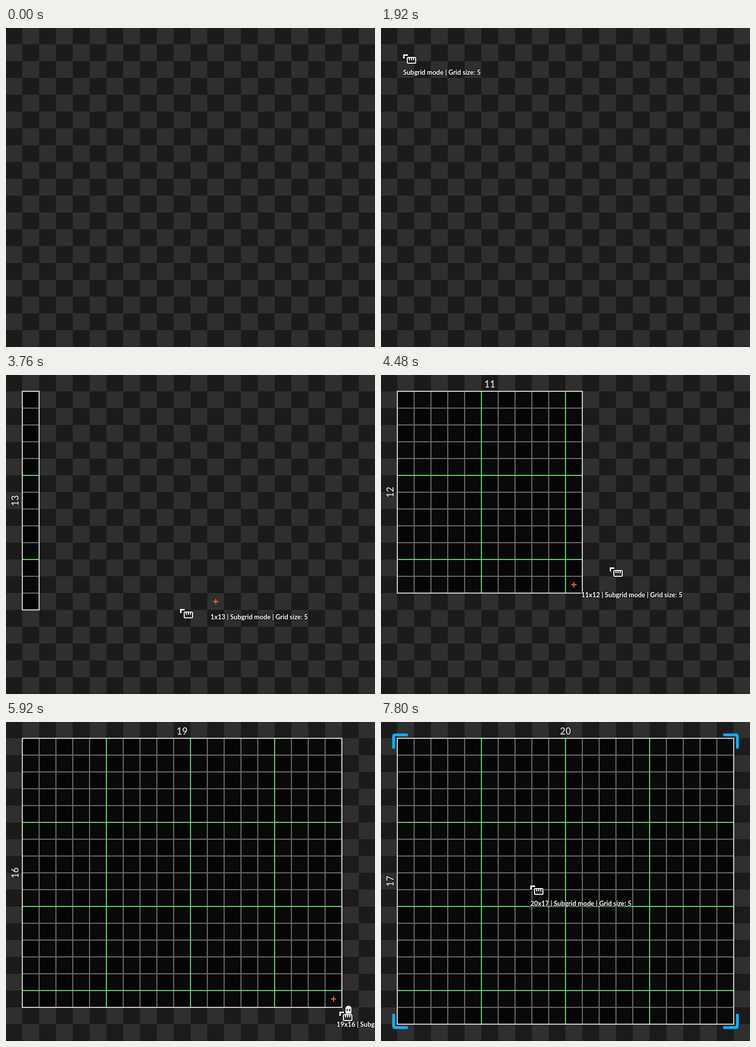
Recreate the animation shown at these times as an HTML page with a canvas. Size 702x607 px, loop 8000 ms.

```html
<!DOCTYPE html>
<html lang="en">
<head>
<meta charset="utf-8">
<title>Grid ruler</title>
<style>
html, body { margin: 0; width: 100%; height: 100%; overflow: hidden; background: #1b1b1b; }
canvas { display: block; }
</style>
</head>
<body>
<canvas id="stage" width="702" height="607"></canvas>
<script>
const W = 702, H = 607, LOOP = 8000, STEP = 40;
const CELL = 32, ORIGIN = 31, MAJOR = 5;
const LAG = 60, REACH = 610;
const SHOW = 640, DRAG = 2160, AREA = 4200, DONE = 6760, SELECT = 7800;
const FONT = 'Lato, "Open Sans", sans-serif';
const INK = '#f2f2f2', SHADE = 'rgba(12,12,12,.75)';
const c = document.getElementById('stage').getContext('2d');

// pointer stops: arrival time, x, y, rest
const path = [
  [640, 363, 545], [1380, 54, 120], [1860, 42, 49, 280],
  [2700, 493, 141], [2760, 541, 152], [3140, 665, 174],
  [3700, 389, 425], [3760, 331, 444], [4060, 115, 474],
  [4640, 508, 340, 120], [5160, 527, 404], [5860, 629, 540],
  [5960, 635, 553, 220], [6380, 655, 559, 320], [7340, 284, 310, 660]
].flatMap(([t, x, y, rest]) => rest ? [[t, x, y], [t + rest, x, y]] : [[t, x, y]]);

const rate = (i, k) => (path[i + 1][k] - path[i][k]) / (path[i + 1][0] - path[i][0]);

// harmonic mean keeps the curve from overshooting its stops
function slope(i, k) {
  if (i === 0 || i === path.length - 1) return 0;
  const a = rate(i - 1, k), b = rate(i, k);
  return a * b > 0 ? 2 * a * b / (a + b) : 0;
}

function pointer(t) {
  t = Math.max(path[0][0], t);
  let i = 0;
  while (i < path.length - 2 && t >= path[i + 1][0]) i++;
  const a = path[i], b = path[i + 1], d = b[0] - a[0];
  const u = (t - a[0]) / d, v = 1 - u;
  const axis = k => v * v * (1 + 2 * u) * a[k] + u * u * (3 - 2 * u) * b[k]
    + d * u * v * (v * slope(i, k) - u * slope(i + 1, k));
  return { x: Math.round(axis(1)), y: Math.round(axis(2)) };
}

const cellAt = v => Math.max(0, Math.floor((v - ORIGIN) / CELL));
const edge = n => ORIGIN + n * CELL;

function rect(color, x, y, w, h) {
  c.fillStyle = color;
  c.fillRect(x, y, w, h);
}

function stroke(color, width) {
  c.strokeStyle = color;
  c.lineWidth = width;
  c.stroke();
}

function write(str, x, y, size, color, align) {
  c.font = `700 ${size}px ${FONT}`;
  c.textAlign = align;
  c.lineJoin = 'round';
  c.lineWidth = 3;
  c.strokeStyle = SHADE;
  c.strokeText(str, x, y);
  c.fillStyle = color;
  c.fillText(str, x, y);
}

function board() {
  rect('#1b1b1b', 0, 0, W, H);
  for (let j = 0; j < 19; j++)
    for (let i = 0; i < 22; i++)
      if ((i + j) % 2) rect('#2f2f2f', edge(i - 1), edge(j - 1), CELL, CELL);
  rect('rgba(36,10,18,.45)', 0, H - 1, W, 1);
}

function ruler(cols, rows) {
  const w = cols * CELL, h = rows * CELL;
  rect('rgba(0,0,0,.81)', ORIGIN, ORIGIN, w, h);
  for (const major of [false, true]) {
    const color = major ? '#65d565' : '#6b6b6b';
    for (let i = 1; i < cols; i++)
      if ((i % MAJOR === 0) === major) rect(color, edge(i) - 1, ORIGIN, 2, h);
    for (let j = 1; j < rows; j++)
      if ((j % MAJOR === 0) === major) rect(color, ORIGIN, edge(j) - 1, w, 2);
  }
  c.strokeStyle = '#d2d2d2';
  c.lineWidth = 2;
  c.lineJoin = 'miter';
  c.strokeRect(ORIGIN, ORIGIN, w, h);
  if (cols > 1) write(cols, ORIGIN + w / 2, 24, 18, '#cdcdcd', 'center');
  if (rows > 1) {
    c.save();
    c.translate(24, ORIGIN + h / 2);
    c.rotate(-Math.PI / 2);
    write(rows, 0, 0, 18, '#cdcdcd', 'center');
    c.restore();
  }
}

function cross(x, y) {
  rect('#f4660f', x - 5, y - 1, 10, 2);
  rect('#f4660f', x - 1, y - 5, 2, 10);
}

function ghost(x, y) {
  c.fillStyle = '#fff';
  c.beginPath();
  c.roundRect(x, y, 11, 20, [5, 5, 2, 2]);
  c.fill();
  for (const eye of [2, 7]) rect('#111', x + eye, y + 6, 2, 4);
}

function icon(x, y) {
  c.save();
  c.translate(x, y);
  rect(SHADE, -1, 0, 11, 5);
  rect(SHADE, -1, 5, 5, 6);
  rect(INK, 0, 1, 9, 3);
  rect(INK, 0, 1, 3, 8);
  c.beginPath();
  c.roundRect(8, 7, 16, 11, 1.5);
  c.fillStyle = 'rgba(42,42,42,.9)';
  c.fill();
  stroke(SHADE, 4);
  stroke(INK, 2);
  for (let i = 0; i < 3; i++) rect(INK, 11 + 4 * i, 8, 2, 4);
  c.restore();
}

function corners(cols, rows) {
  const x = cols * CELL / 2 + 7, y = rows * CELL / 2 + 6.5;
  for (const sx of [-1, 1]) for (const sy of [-1, 1]) {
    c.save();
    c.translate(ORIGIN + cols * CELL / 2, ORIGIN + rows * CELL / 2);
    c.scale(sx, sy);
    c.beginPath();
    c.moveTo(x - 27, y);
    c.lineTo(x - 3, y);
    c.quadraticCurveTo(x, y, x, y - 3);
    c.lineTo(x, y - 26);
    stroke('#0878c4', 6);
    stroke('#12b4ff', 4);
    c.restore();
  }
}

// a line along the longer axis at first, a full area later
function spanAt(t, p) {
  if (t >= DONE) return [20, 17];
  const cols = cellAt(p.x) + 1, rows = cellAt(p.y) + 1;
  if (t >= AREA) return [cols, rows];
  return cols >= rows ? [cols, 1] : [1, rows];
}

function draw(t) {
  board();
  if (t < SHOW) return;
  const p = pointer(t), q = pointer(t - LAG);
  let label = 'Subgrid mode | Grid size: 5';
  if (t >= DRAG) {
    const [cols, rows] = spanAt(t, q);
    ruler(cols, rows);
    label = `${cols}x${rows} | ${label}`;
    if (t < DONE) cross(edge(cellAt(q.x)) + 16, edge(cellAt(q.y)) + 16);
    if (t >= SELECT) corners(cols, rows);
    if (Math.hypot(q.x, q.y) > REACH) ghost(q.x + 17, q.y);
  }
  write(label, q.x, q.y + 40, 12.5, '#fff', 'left');
  icon(p.x, p.y);
}

const start = performance.now();
function tick() {
  const t = (performance.now() - start) % LOOP;
  draw(Math.floor(t / STEP) * STEP);
  requestAnimationFrame(tick);
}
tick();
</script>
</body>
</html>
```
